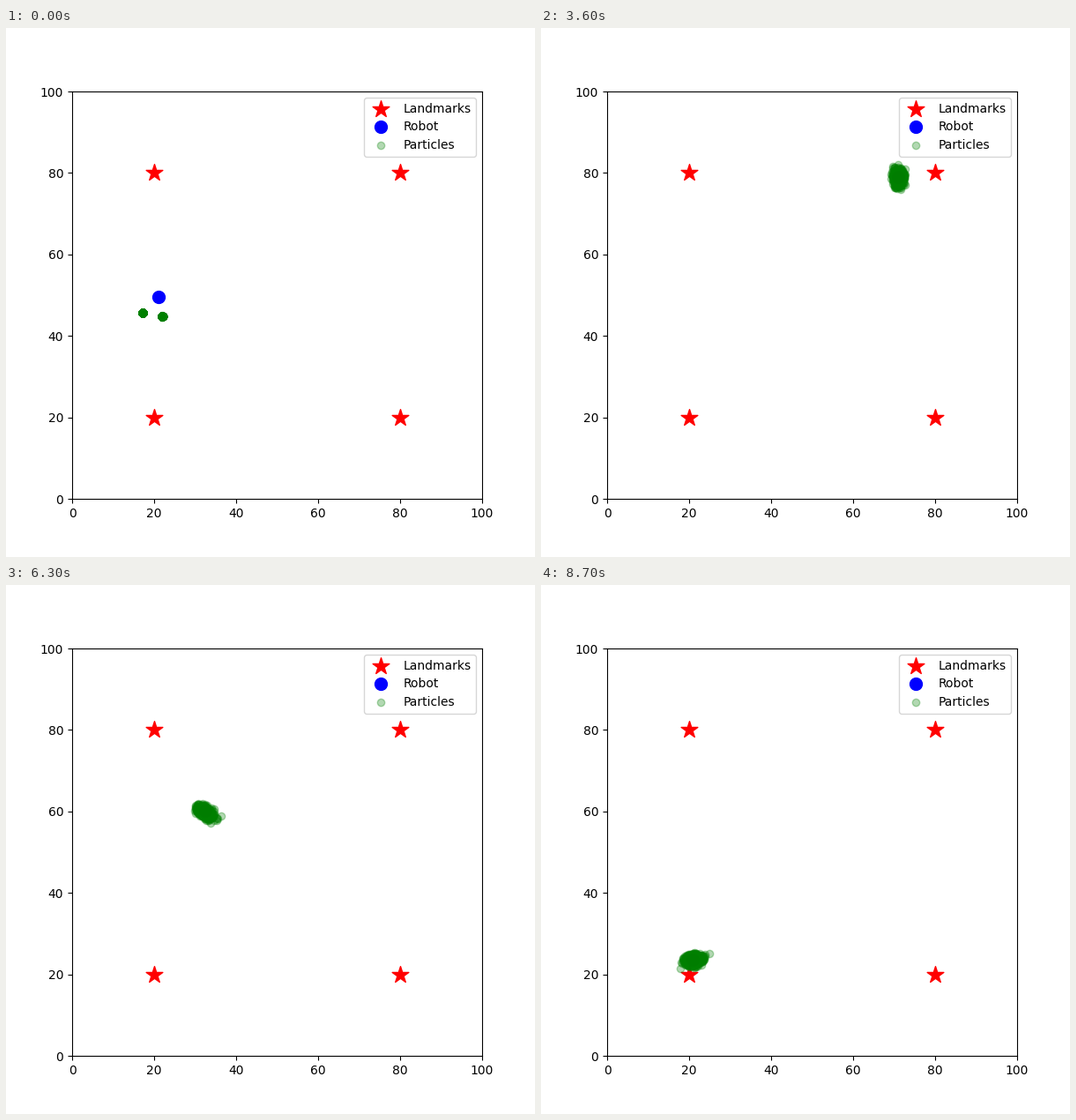
Animation of 600 by 600 pixels, one loop 9 s. Source, as a matplotlib script:

```python
import numpy as np
import matplotlib.pyplot as plt
from matplotlib.animation import FuncAnimation

FRAMES, STEP_MS = 30, 300
SIZE = 100
SPEED, TURN, HEADING = 5, 0.1, 2.03
COUNT = 500
ALONG, ACROSS = 0.65, 1.15
CLUMP_GAP = (4.8, -0.8)

# Rows of step, x, y; x runs below zero where the world wraps around.
WAYPOINTS = np.array([(0, 21.1, 49.5), (4, 9, 66.8), (8, -9.4, 77.5),
                      (12, -29, 79), (17, -52.4, 72.3), (24, -74.7, 47.9),
                      (29, -79.1, 23.6)])
# How far the estimate is off the robot, until it has locked on.
ERROR = np.array([(0, -3.9, -3.9), (4, -2.8, -3.1), (8, 1.6, 0.5),
                  (12, 0, 0), (17, -0.8, -0.8), (24, 0.2, 0)])

steps = np.arange(FRAMES)
heading = HEADING + TURN * steps


def between(rows):
    return np.column_stack([np.interp(steps, rows[:, 0], col) for col in rows.T[1:]])


def drive():
    """Constant-turn arc, nudged so that it passes through the waypoints."""
    moves = SPEED * np.column_stack([np.cos(heading), np.sin(heading)])
    arc = np.cumsum(moves, axis=0) - moves
    drift = WAYPOINTS.copy()
    drift[:, 1:] -= arc[drift[:, 0].astype(int)]
    return arc + between(drift)


robot_path = drive()
cloud_path = robot_path + between(ERROR)


def particles_at(k):
    """Cloud around the estimate, widest across the direction of travel."""
    rng = np.random.default_rng(k)
    along = ALONG * min(1, k / 4) * rng.standard_normal(COUNT)
    across = ACROSS * (1 - np.exp(-k / 5)) * rng.standard_normal(COUNT)
    c, s = np.cos(heading[k]), np.sin(heading[k])
    pts = cloud_path[k] + np.column_stack([c * along - s * across,
                                           s * along + c * across])
    if k == 0:
        pts[::2] += rng.normal(CLUMP_GAP, 0.04, (COUNT // 2, 2))
    return pts % SIZE


fig, ax = plt.subplots(figsize=(6, 6), dpi=100)
ax.set_xlim(0, SIZE)
ax.set_ylim(0, SIZE)
ax.scatter([20, 20, 80, 80], [20, 80, 20, 80], marker="*", s=200, c="red",
           label="Landmarks")
robot, = ax.plot([], [], "bo", markersize=10, label="Robot")
particles, = ax.plot([], [], "go", alpha=0.3, label="Particles")
ax.legend(loc="upper right")


def draw(k):
    robot.set_data(*(robot_path[k:k + 1] % SIZE).T)
    particles.set_data(*particles_at(k).T)
    return robot, particles


anim = FuncAnimation(fig, draw, frames=FRAMES, interval=STEP_MS,
                     repeat=True, repeat_delay=0)
plt.show()
```
